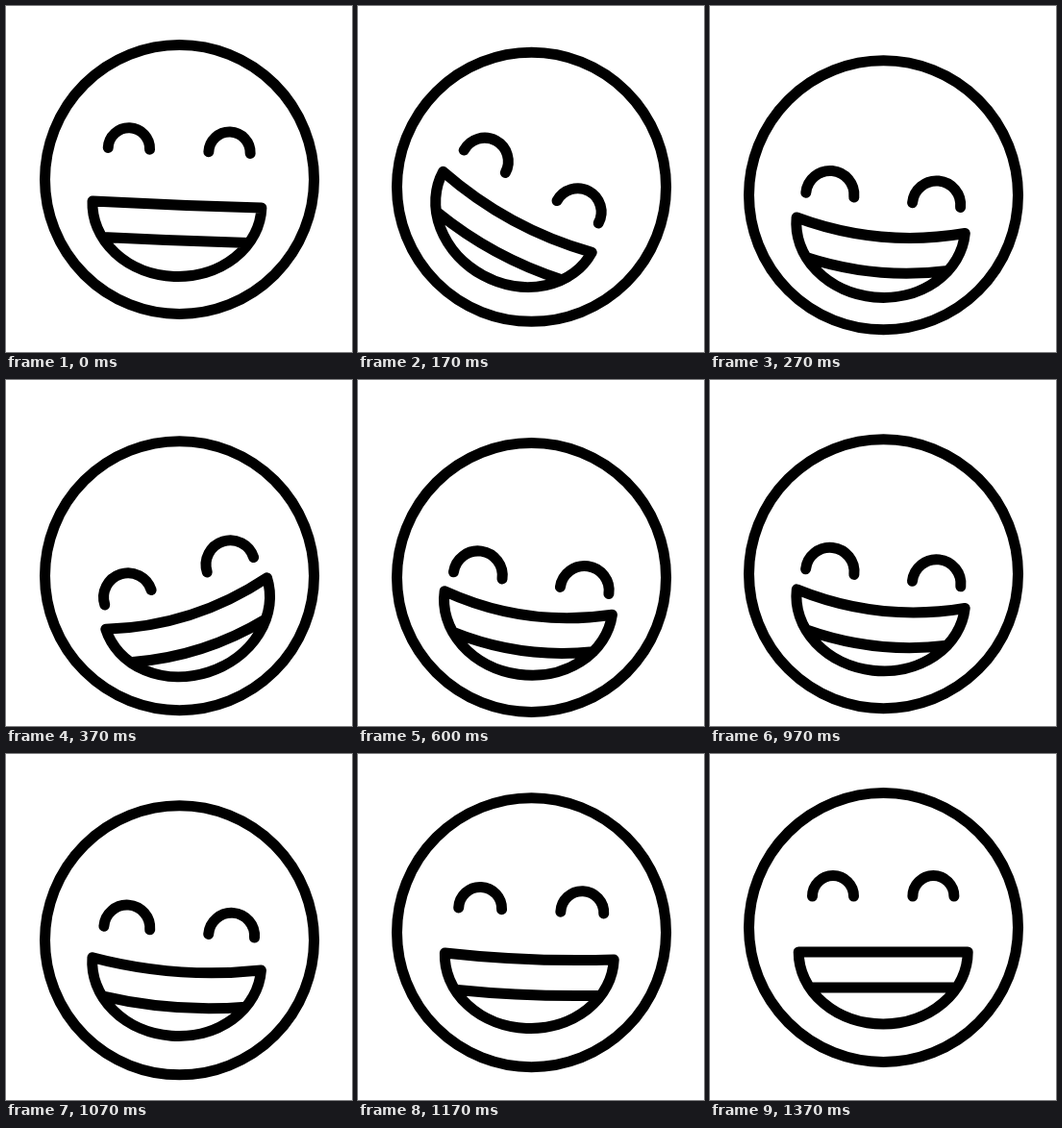
An HTML page that plays this animation: 360x360 px, repeating every 1670 ms.

```html
<!DOCTYPE html>
<html lang="en">
<head>
<meta charset="utf-8">
<title>Laughing face</title>
<style>
  html, body { margin: 0; width: 100%; height: 100%; overflow: hidden; background: #fff; }
  svg { display: block; width: 100%; height: 100%; }
  svg * { fill: none; stroke: #000; stroke-width: 11; stroke-linecap: round; stroke-linejoin: round; }
</style>
</head>
<body>
<svg viewBox="0 0 360 360">
  <circle id="head" cx="180.5" r="140"/>
  <g id="face">
    <path id="eyes"/>
    <path id="mouth"/>
  </g>
</svg>
<script>
const LOOP = 1670;
const [head, face, eyes, mouth] = ['head', 'face', 'eyes', 'mouth'].map(id => document.getElementById(id));

// step (30 per second), tilt, eye height, eye-to-mouth gap, squeeze
const KEYS = [
  [-1, 0, 148, 58, 0],
  [0, 2.3, 150.5, 56, 0.04],
  [5, 28.5, 188, 30, 0.76],
  [11, -17.7, 209.2, 24.5, 0.97],
  [18, 8, 211.2, 21, 1],
  [26, 7.6, 210.8, 21, 1],
  [29, 6.4, 205.8, 22, 0.95],
  [35, 2.3, 163, 47.5, 0.24],
  [41, 0, 148, 58, 0]
];

const smooth = x => {
  x = Math.min(1, Math.max(0, x));
  return x * x * (3 - 2 * x);
};

const slope = (i, c) => (KEYS[i + 1][c] - KEYS[i][c]) / (KEYS[i + 1][0] - KEYS[i][0]);

// Monotone tangent: flat at turning points, harmonic mean elsewhere
function tangent(i, c) {
  if (i === 0 || i === KEYS.length - 1) return 0;
  const a = slope(i - 1, c), b = slope(i, c);
  return a * b <= 0 ? 0 : 2 * a * b / (a + b);
}

function sample(step, c) {
  let i = 0;
  while (i < KEYS.length - 2 && step >= KEYS[i + 1][0]) i++;
  const p = KEYS[i], q = KEYS[i + 1], span = q[0] - p[0];
  const x = Math.min(1, (step - p[0]) / span);
  return p[c] + (q[c] - p[c]) * smooth(x)
    + span * x * (1 - x) * ((1 - x) * tangent(i, c) - x * tangent(i + 1, c));
}

const eye = (x, r) => `M${x - r} 0A${r} ${r} 0 0 1 ${x + r} 0`;

// Sagging line of half-width w, hung at height y
function sagLine(w, y, sag) {
  const k = (w / 88) ** 2;
  const end = y + sag * (1 - k);
  return `M${-w} ${end}Q0 ${end + 2 * sag * k} ${w} ${end}`;
}

function draw(ms) {
  const step = Math.floor((ms % LOOP) * 0.03 + 0.12);
  const [tilt, y, gap, squeeze] = [1, 2, 3, 4].map(c => sample(step, c));
  const drop = smooth((step - 0.15) / 13) - smooth((step - 25.8) / 13);
  const r = 21.5 + 4 * squeeze;
  const half = 52.2 + 3.8 * squeeze;
  const sag = 13 * squeeze;

  head.setAttribute('cy', 180.5 + 25 * drop);
  face.setAttribute('transform', `translate(180.2 ${y}) rotate(${tilt})`);
  eyes.setAttribute('d', eye(-half, r) + eye(half, r));
  mouth.setAttribute('transform', `translate(0 ${gap})`);
  mouth.setAttribute('d',
    sagLine(88, 0, sag) + 'A88 75 0 0 1 -88 0Z' + sagLine(76.5 - 0.2 * sag, 37, sag));
}

const start = performance.now();
function tick() {
  draw(performance.now() - start);
  requestAnimationFrame(tick);
}
tick();
</script>
</body>
</html>
```
